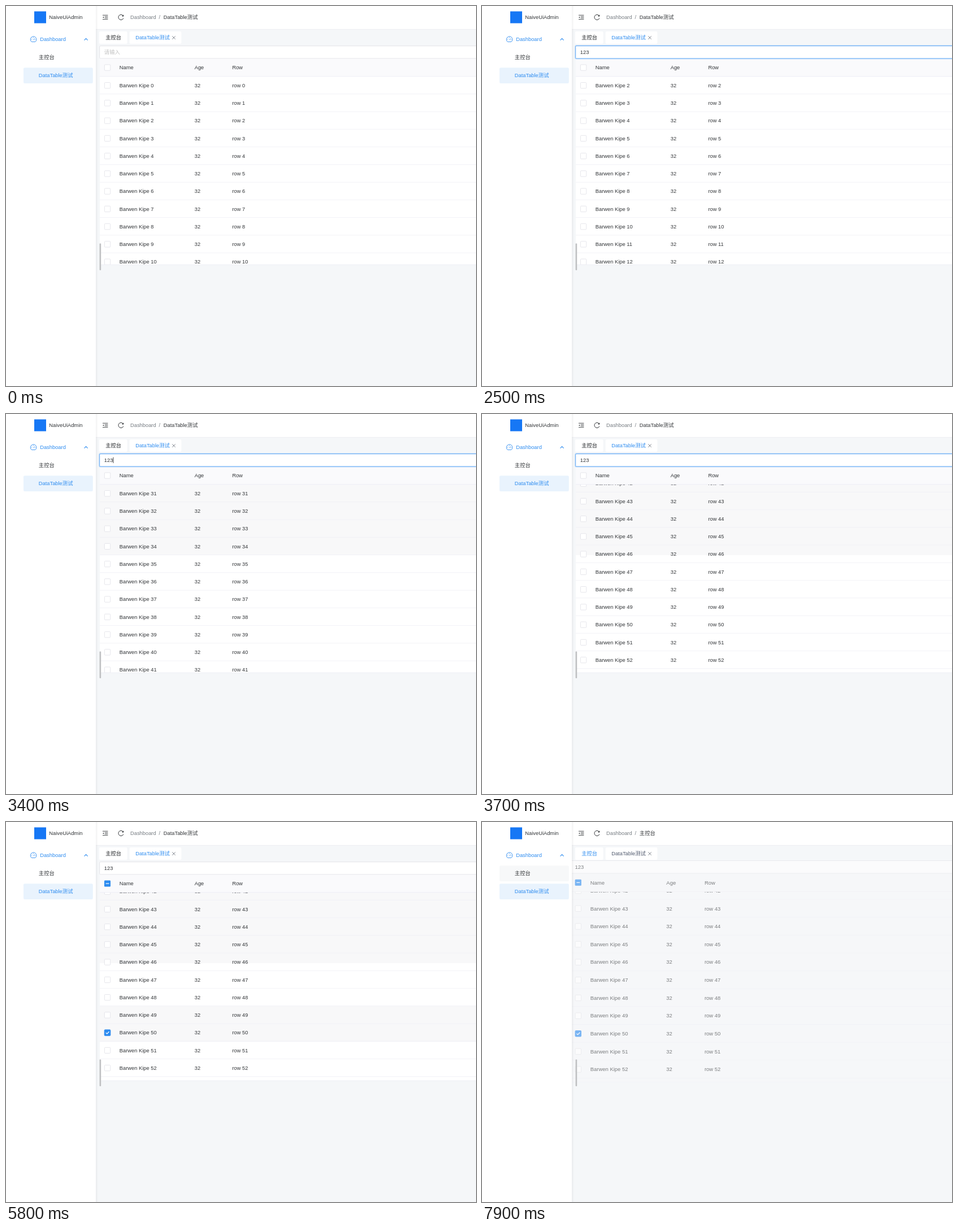
Animation, 832 px wide and 673 px high, one loop 8000 ms. Source, as an HTML page:

```html
<!DOCTYPE html>
<html lang="zh-CN">
<head>
<meta charset="utf-8">
<style>
html, body { margin: 0; width: 100%; height: 100%; overflow: hidden; background: #f5f7f9; }
svg { display: block; }
text { font: 9.33px "Liberation Sans", "Noto Sans CJK SC", "Noto Sans CJK", sans-serif; fill: #333639; white-space: pre; }
.blue { fill: #2d8cf0; }
.line { fill: none; stroke: #333639; stroke-width: .9; }
.bluish { stroke: #2d8cf0; }
.box { fill: #fff; stroke: #e0e0e6; stroke-width: .8; }
.tick { fill: none; stroke: #fff; stroke-width: 1.2; }
</style>
</head>
<body>
<svg width="832" height="673" viewBox="0 0 832 673">
  <clipPath id="body"><rect x="166" y="125" width="700" height="333"/></clipPath>
  <linearGradient id="shade"><stop stop-color="#1d2329" stop-opacity=".06"/><stop offset="1" stop-color="#1d2329" stop-opacity="0"/></linearGradient>
  <rect width="832" height="673" fill="#f5f7f9"/>

  <g id="page">
    <rect x="166" y="70.5" width="700" height="387.5" fill="#fff"/>
    <rect x="166" y="94" width="700" height="31" fill="#fafafc"/>
    <g id="bands" fill="#f8f8f9"></g>
    <g clip-path="url(#body)"><g id="rows"></g></g>
    <path d="M166 124.7H866M166 458.2H866" stroke="#efeff5" stroke-width=".9"/>
    <g id="header"></g>
    <g id="partial">
      <rect class="blue" x="174" y="103.5" width="11" height="11" rx="1.3"/>
      <path class="tick" d="M176.6 109H182.4"/>
    </g>
    <rect id="glow" x="165" y="70" width="720" height="23.6" rx="2" fill="none" stroke="#2d8cf0" stroke-opacity=".3" stroke-width="1.4"/>
    <rect id="field" x="165.7" y="70.7" width="720" height="22.2" rx="1.5" fill="#fff" stroke-width=".9"/>
    <text id="value" x="173.8" y="85.3"></text>
    <rect id="caret" y="76.5" width=".9" height="10.5" fill="#333639"/>
  </g>
  <rect x="165.6" y="420.5" width="2.6" height="47.5" rx="1" fill="#bfc0c2"/>

  <rect x="159" width="673" height="41" fill="#fff"/>
  <path d="M159 41.4H832" stroke="#eceef2"/>
  <g class="line">
    <path d="M171 16.3H180.4M174.8 18.8H180.4M174.8 21.2H180.4M171 23.7H180.4"/>
    <path d="M173.2 18.4V21.6L171.2 20Z" fill="#333639" stroke="none"/>
    <path d="M207.3 17.2A4.6 4.6 0 1 0 207.9 21.6" stroke-width="1"/>
    <path d="M208.2 15.2V18.4H205" fill="#333639" stroke="none"/>
  </g>
  <text x="220" y="23.3" style="fill:#767c82">Dashboard</text>
  <text x="270.6" y="23.3" style="fill:#767c82">/</text>
  <text id="crumb" x="278.8" y="23.3"></text>

  <rect x="165" y="45" width="49.6" height="22" rx="2" fill="#fff"/>
  <rect x="218.6" y="45" width="91.8" height="22" rx="2" fill="#fff"/>
  <text id="homeTab" x="176.2" y="59.3">主控台</text>
  <text id="tableTab" x="229.2" y="59.3">DataTable测试</text>
  <path class="line" d="M294.2 53.3L299.8 58.9M299.8 53.3L294.2 58.9" style="stroke:#777c85"/>

  <rect width="159" height="673" fill="#fff"/>
  <rect x="159" width="4" height="673" fill="url(#shade)"/>
  <rect x="50" y="9.5" width="21" height="21" fill="#1677f5"/>
  <text x="76.3" y="23.3">NaiveUiAdmin</text>
  <g class="line bluish">
    <path d="M45.3 63.4A5.3 5.3 0 1 1 51.9 63.4Z"/>
    <path d="M48.3 60.3L50.8 57.5M48.6 55.3V56.4M44.8 59.3H45.9M51.4 59.3H52.4M45.9 56.6L46.6 57.3"/>
    <path d="M138.6 60.6L141.6 57.6L144.6 60.6" stroke-width="1.1"/>
  </g>
  <text class="blue" x="60.2" y="62.4">Dashboard</text>
  <rect id="homeItem" x="31" y="77.3" width="122.8" height="27.7" rx="2" fill="#f7f8f9"/>
  <text x="57.8" y="94.4">主控台</text>
  <rect x="31" y="109.3" width="122.8" height="27.7" rx="2" fill="#e9f3fd"/>
  <text class="blue" x="57.8" y="126.4">DataTable测试</text>
</svg>
<script>
const LOOP = 8000, PITCH = 31.25, TOP = 125, LAST = 56, PICKED = 50;
const $ = id => document.getElementById(id);
const set = (id, attrs) => { for (const k in attrs) $(id).setAttribute(k, attrs[k]); };
const show = (id, on) => set(id, { visibility: on ? 'visible' : 'hidden' });

// Value of the latest [time, value] step
const step = (t, ...steps) => steps.reduce((v, [from, next]) => t >= from ? next : v, steps[0][1]);

const cells = (y, ...texts) =>
  `<rect class="box" x="174.4" y="${y - 5.1}" width="10.3" height="10.3" rx="1.2"/>` +
  texts.map((s, i) => `<text x="${[200.8, 333.7, 400.4][i]}" y="${y + 3.3}">${s}</text>`).join('');

$('header').innerHTML = cells(109, 'Name', 'Age', 'Row');

const middle = i => TOP + (i + .5) * PITCH;
for (let i = 0; i < LAST; i++) {
  const edge = TOP + (i + 1) * PITCH - .4;
  $('rows').innerHTML += `<path d="M166 ${edge}H866" stroke="#efeff5" stroke-width=".8"/>` +
    cells(middle(i), 'Barwen Kipe ' + i, 32, 'row ' + i);
}
const py = middle(PICKED);
$('rows').innerHTML += `
  <rect id="ring" x="173.5" y="${py - 6}" width="12.1" height="12.1" rx="2" fill="#2d8cf0" fill-opacity=".3"/>
  <rect id="pick" x="174.4" y="${py - 5.1}" width="10.3" height="10.3" rx="1.2" stroke="#2d8cf0" stroke-width=".9"/>
  <path id="check" class="tick" d="M176.8 ${py}L178.8 ${py + 2}L182.5 ${py - 1.9}"/>`;

// Row shading left by the pointer: [start, end, top, bottom]
const shading = [
  [2900, 3300, 170, 250], [3300, 6100, 125, 250], [5000, 7800, 326, 389],
  [6100, 7800, 125, 201], [6100, 7800, 233, 250], [6100, 7800, 264, 295], [7800, 8000, 94, 458],
];
$('bands').innerHTML = shading.map(([, , a, b], i) =>
  `<rect id="band${i}" x="166" y="${a}" width="700" height="${b - a}"/>`).join('');

function draw(t) {
  shading.forEach(([from, to], i) => show('band' + i, t >= from && t < to));

  const scroll = step(t, [0, 0], [2500, 2], [2700, 5], [2900, 8], [3100, 11.56], [3200, 17],
    [3300, 24], [3400, 31], [3600, 37], [3700, 42.56]);
  set('rows', { transform: `translate(0 ${-scroll * PITCH})` });

  const typed = step(t, [0, ''], [1300, '1'], [1400, '12'], [1600, '123']);
  $('value').textContent = typed || '请输入';
  $('value').style.fill = typed ? '#333639' : '#c2c2c2';
  set('field', { stroke: step(t, [0, '#e0e0e6'], [600, '#b0d0f0'], [700, '#7db7f4'], [1000, '#57a3f3'],
    [5500, '#9cc8f3'], [5700, '#e0e0e6'], [6400, '#7db7f4'], [6700, '#e0e0e6']) });
  set('glow', { opacity: step(t, [0, 0], [1000, .4], [1100, 1], [5500, .5], [5600, 0]) });
  show('caret', step(t, [0, 0], [1000, 1], [2100, 0], [2900, 1], [3600, 0], [4100, 1], [4600, 0], [5100, 1], [5400, 0]));
  set('caret', { x: 173.9 + typed.length * 5.19 });

  const checked = t >= 5500;
  show('pick', t >= 5200);
  set('pick', { fill: step(t, [0, '#fff'], [5500, '#96c5f7'], [5600, '#2d8cf0']) });
  show('check', checked);
  show('ring', checked && t < 7200);
  show('partial', checked);

  const leaving = step(t, [0, 0], [7800, .35], [7900, 1]);
  set('page', {
    opacity: 1 - .38 * leaving,
    transform: `translate(920 246) scale(${1 + .0125 * leaving}) translate(-920 -246)`,
  });
  $('crumb').textContent = leaving ? '主控台' : 'DataTable测试';
  show('homeItem', leaving);
  $('homeTab').style.fill = step(t, [0, '#1f2225'], [6500, '#5c626b'], [7200, '#2d8cf0']);
  $('tableTab').style.fill = step(t, [0, '#2d8cf0'], [7200, '#46668a'], [7500, '#515a6e']);
}

const start = performance.now();
(function tick() {
  draw((performance.now() - start) % LOOP);
  requestAnimationFrame(tick);
})();
</script>
</body>
</html>
```
